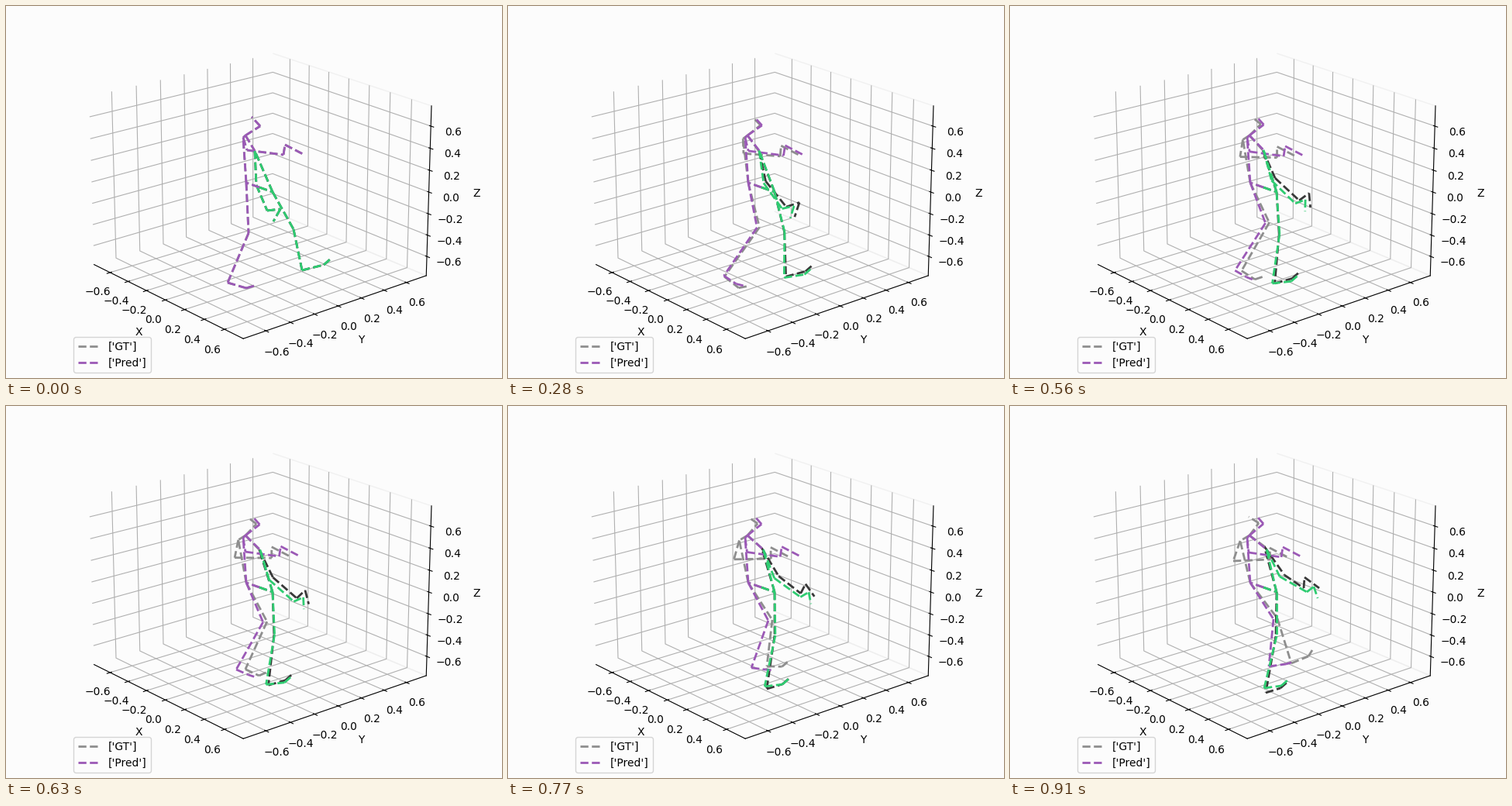
Animation of 640x480 px, one loop 980 ms. Source, as a matplotlib script:

```python
import numpy as np
import matplotlib.pyplot as plt
from matplotlib.animation import FuncAnimation
from matplotlib.lines import Line2D

W, H = 640, 480
FRAMES, INTERVAL = 14, 70
BACK = "#fcfcfc"

# Joints that stay in place, in pixels from the top left
ROOTS = {"pelvis": (327, 234), "lhip": (310, 228), "rhip": (344, 240), "thorax": (309, 167)}

# First pose: joint -> (parent, offset from the parent)
POSE = {
    "lknee": ("lhip", (3, 65)),
    "lankle": ("lknee", (-27, 64)),
    "lfoot": ("lankle", (24, 7)),
    "ltoe": ("lfoot", (10, -3)),
    "lsho": ("thorax", (-3, 3)),
    "lelb": ("lsho", (5, 16)),
    "lwri": ("lelb", (47, 6)),
    "lhand": ("lwri", (2, -13)),
    "ltip": ("lhand", (25, 13)),
    "rsho": ("thorax", (12, 20)),
    "neck": ("thorax", (19, -12)),
    "head": ("neck", (-11, -12)),
    "rknee": ("rhip", (27, 48)),
    "rankle": ("rknee", (11, 53)),
    "rfoot": ("rankle", (28, -7)),
    "rtoe": ("rfoot", (8, -7)),
    "relb": ("rsho", (2, 44)),
    "rwri": ("relb", (14, 33)),
    "rhand": ("rwri", (17, -2)),
    "rtip": ("rhand", (-9, 16)),
}
TORSO = [("pelvis", "lhip"), ("lhip", "lsho"), ("pelvis", "rhip"), ("rhip", "rsho")]

# How a bone moves: (drift over the loop, sway at half time)
STILL = ((0, 0), (0, 0))
TRUE_MOVES = {
    "lknee": ((32, -19), (2, -2)),
    "lankle": ((45, -6), (-39, 2)),
    "lfoot": ((-2, -16), (-6, 15)),
    "ltoe": ((-5, -5), (3, 3)),
    "lsho": ((-9, 4), (0, 0)),
    "lelb": ((-14, 10), (0, 0)),
    "lwri": ((1, -8), (0, 0)),
    "lhand": ((-3, -2), (0, 0)),
    "rsho": ((7, -6), (1, 3)),
    "neck": ((-7, -4), (0, 0)),
    "head": ((-2, 4), (3, 2)),
    "rknee": ((-28, 9), (-7, 1)),
    "rankle": ((-24, 20), (-2, -2)),
    "rfoot": ((-9, 1), (0, 0)),
    "relb": ((24, -7), (-1, -4)),
    "rwri": ((11, -16), (11, 6)),
    "rhand": ((-16, -12), (6, 0)),
    "rtip": ((28, -2), (-7, 4)),
}
PRED_MOVES = {
    "lknee": ((27, -18), (0, -2)),
    "lankle": ((21, -3), (-27, -1)),
    "lfoot": ((-2, -10), (-9, 8)),
    "ltoe": ((-3, 1), (0, 6)),
    "lelb": ((-3, 3), (0, 0)),
    "lwri": ((-5, 0), (0, 0)),
    "rsho": ((10, -2), (0, 0)),
    "neck": ((-1, -3), (0, 0)),
    "head": ((4, 4), (0, 0)),
    "rknee": ((-27, 9), (-7, 1)),
    "rankle": ((-27, 14), (-4, 2)),
    "rfoot": ((-6, 4), (0, 2)),
    "relb": ((15, -9), (-1, 1)),
    "rwri": ((21, -13), (4, 5)),
    "rhand": ((-8, -5), (1, 0)),
    "rtip": ((14, -1), (0, 0)),
}


def pose(moves, u):
    """Joint positions at phase u (0 to 1), built outward from the roots."""
    joints = {name: np.array(p, float) for name, p in ROOTS.items()}
    for name, (parent, offset) in POSE.items():
        drift, sway = np.array(moves.get(name, STILL))
        joints[name] = joints[parent] + offset + drift * u + sway * np.sin(np.pi * u)
    return joints


def make_scene(fig):
    ax = fig.add_axes([0, 0, 1, 1], projection="3d")
    ax.patch.set_visible(False)
    ax.view_init(elev=20, azim=-40)
    lim = 0.75 * 25 / 24
    ticks = np.arange(-3, 4) / 5
    ax.set(
        xlim=(-lim, lim), ylim=(-lim, lim), zlim=(-lim, lim),
        xticks=ticks, yticks=ticks, zticks=ticks,
        xlabel="X", ylabel="Y", zlabel="Z",
    )
    for axis in (ax.xaxis, ax.yaxis, ax.zaxis):
        axis.pane.fill = False
    ax.xaxis.pane.set_edgecolor(BACK)
    handles = [
        Line2D([], [], color="#8e8e8e", lw=2, ls="--", label="['GT']"),
        Line2D([], [], color="#9b59b6", lw=2, ls="--", label="['Pred']"),
    ]
    ax.legend(handles=handles, loc="lower left", facecolor=BACK)


def make_bones(ax, left, right):
    """One dashed line per bone, the right limbs in their own colour."""
    links = [(parent, name) for name, (parent, _) in POSE.items()] + TORSO
    bones = []
    for a, b in links:
        is_right = b[0] == "r" and a != "thorax"
        (line,) = ax.plot([], [], color=right if is_right else left, lw=2, ls="--")
        bones.append((line, a, b))
    return bones


fig = plt.figure(figsize=(W / 100, H / 100), dpi=100, facecolor=BACK)
make_scene(fig)

stage = fig.add_axes([0, 0, 1, 1])
stage.set_axis_off()
figures = [
    (make_bones(stage, "#8e8e8e", "#383838"), TRUE_MOVES),
    (make_bones(stage, "#9b59b6", "#2ecc71"), PRED_MOVES),
]
stage.set(xlim=(0, W), ylim=(H, 0))


def update(n):
    u = n / (FRAMES - 1)
    for bones, moves in figures:
        joints = pose(moves, u)
        for line, a, b in bones:
            line.set_data(*zip(joints[a], joints[b]))
    return stage.lines


anim = FuncAnimation(fig, update, frames=FRAMES, interval=INTERVAL, repeat=True, blit=False)
plt.show()
```
